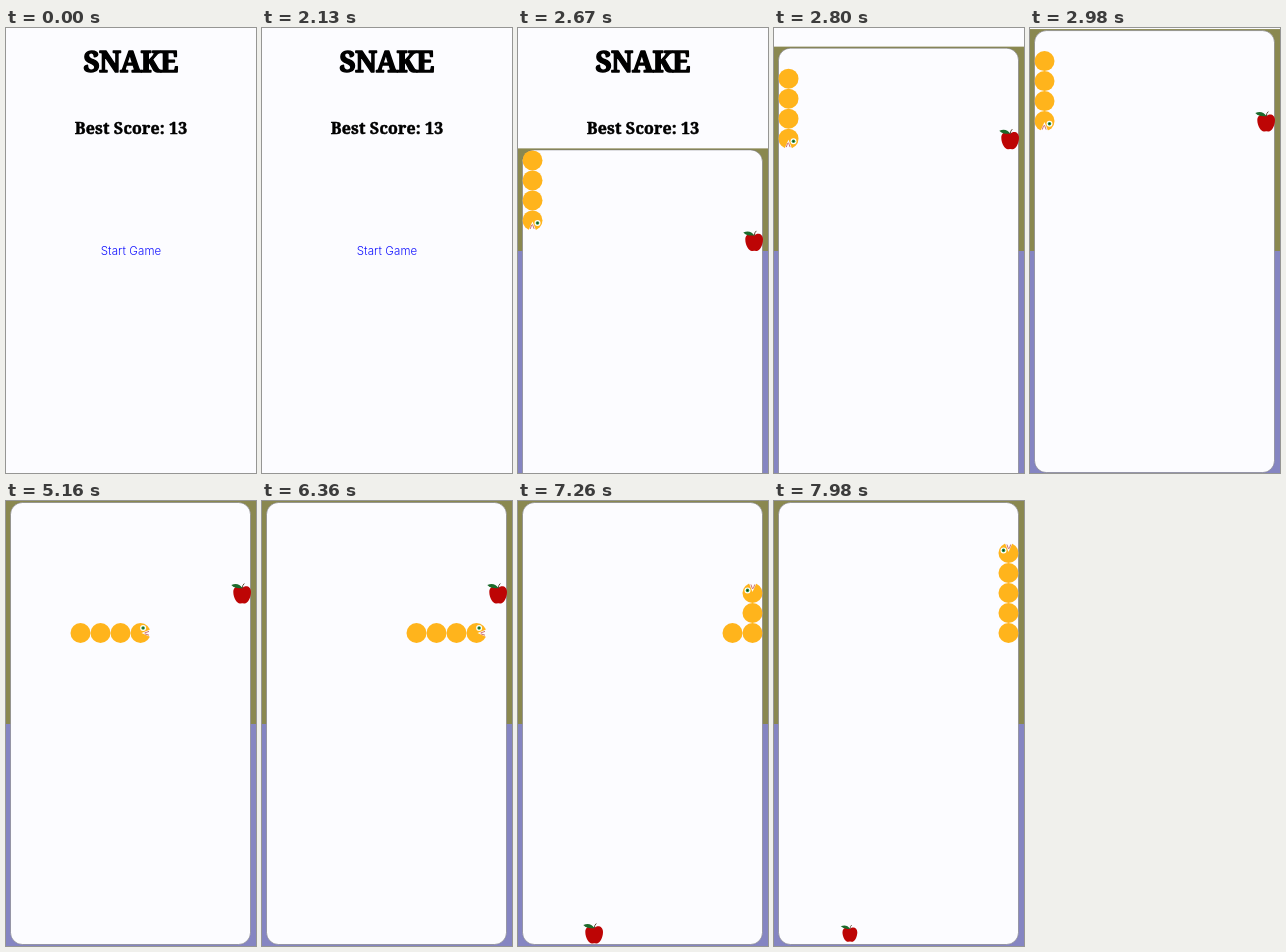
Write an HTML page that moves like this. It is 250 px wide and 445 px high and loops after 8000 ms.

```html
<!DOCTYPE html>
<html lang="en">
<head>
<meta charset="utf-8">
<title>Snake</title>
<style>
  html, body { margin: 0; width: 100%; height: 100%; overflow: hidden; background: #fcfcff; }
  svg { display: block; width: 250px; height: 445px; }
  text { text-anchor: middle; }
  .slab { font-family: "Noto Serif", serif; font-weight: 700; stroke: #000; stroke-linejoin: round; }
</style>
</head>
<body>
<svg viewBox="0 0 250 445">
  <defs>
    <circle id="ball" r="10" fill="#ffb41c"/>
    <g id="face">
      <use href="#ball"/>
      <path d="M11-4 1 0 11 4.5Z" fill="#fcfcff"/>
      <path d="M8.5-1.6 4 0M8.5 2.2 4.5.9" stroke="#c8605c" stroke-width=".9"/>
      <circle cx="2.6" cy="-5" r="3" fill="#fff"/>
      <circle cx="2.6" cy="-5" r="1.8" fill="#2f9a48"/>
      <circle cx="2.6" cy="-5" r=".8" fill="#12301c"/>
    </g>
  </defs>

  <text class="slab" x="124.5" y="44" font-size="28" letter-spacing="-.9" stroke-width="1.4">SNAKE</text>
  <text class="slab" x="125" y="106" font-size="16" letter-spacing=".15" stroke-width=".5">Best Score: 13</text>
  <text x="125" y="227" font-size="11.5" font-family="Inter, sans-serif" font-weight="300" letter-spacing=".1" fill="#1414ff">Start Game</text>

  <g id="game">
    <rect id="upper" width="250" height="445" fill="#8a8850"/>
    <rect id="lower" width="250" height="445" fill="#8585c2"/>
    <g id="board">
      <rect x="4.5" y="1.5" width="240" height="442" rx="12" fill="#fcfcff" stroke="#77777f" stroke-width=".6"/>
      <g id="apple">
        <path d="M1.8-5C4.8-8 10.5-7 10.5-1 10.5 5 6.8 11 3.8 10.5Q1.8 10-.2 10.5C-3.2 11-7.2 5-7.2-1-7.2-7-1.2-8 1.8-5Z" fill="#bd0505"/>
        <path d="M1.8-4.5Q1.8-8 3.8-9.5" fill="none" stroke="#5a4632"/>
        <path d="M-9.2-8Q-2.2-11 1.8-5-5.2-4-9.2-8Z" fill="#1c6b2c"/>
      </g>
      <g id="snake"></g>
    </g>
  </g>
</svg>
<script>
const LOOP = 8000, OPEN = 2529.5, EATEN = 7260, STEP = 300;
const $ = id => document.getElementById(id);
const set = (id, name, value) => $(id).setAttribute(name, value);
const place = (col, row) => `translate(${14.5 + 20 * col} ${12 + 20 * row})`;

// The route goes down the left side, across, then up the right side.
const cell = i => i <= 6 ? [0, i] : i <= 17 ? [i - 6, 6] : [11, 23 - i];
const heading = i => i <= 6 ? 90 : i <= 17 ? 0 : -90;

const parts = Array.from({ length: 5 }, (_, i) => {
  const part = document.createElementNS("http://www.w3.org/2000/svg", "use");
  part.setAttribute("href", i ? "#ball" : "#face");
  return $("snake").appendChild(part);
});

// Critically damped spring for the rising sheet.
function sheetTop(t) {
  const x = 0.01826 * Math.max(0, t - OPEN);
  return 445 * (1 + x) * Math.exp(-x);
}

function draw(t) {
  const top = t > 3130 ? 0 : sheetTop(t);
  set("game", "visibility", t < OPEN ? "hidden" : "visible");
  set("upper", "y", top);
  set("lower", "y", Math.max(top, 223));
  set("board", "transform", `translate(0 ${top})`);

  const head = Math.max(3, 6 + Math.floor((t - 3360) / STEP));
  parts.forEach((part, i) => {
    const turn = i ? "" : ` rotate(${heading(head)})`;
    part.setAttribute("transform", place(...cell(head - i)) + turn);
  });
  parts[4].style.display = head < 20 ? "none" : "";

  const eaten = t >= EATEN;
  const scale = eaten ? 1 - 0.16 * (t - EATEN) / 720 : 1;
  set("apple", "transform", `${eaten ? place(3, 21) : place(11, 4)} scale(${scale})`);
}

const start = performance.now();
function tick() {
  draw((performance.now() - start) % LOOP);
  requestAnimationFrame(tick);
}
tick();
</script>
</body>
</html>
```
